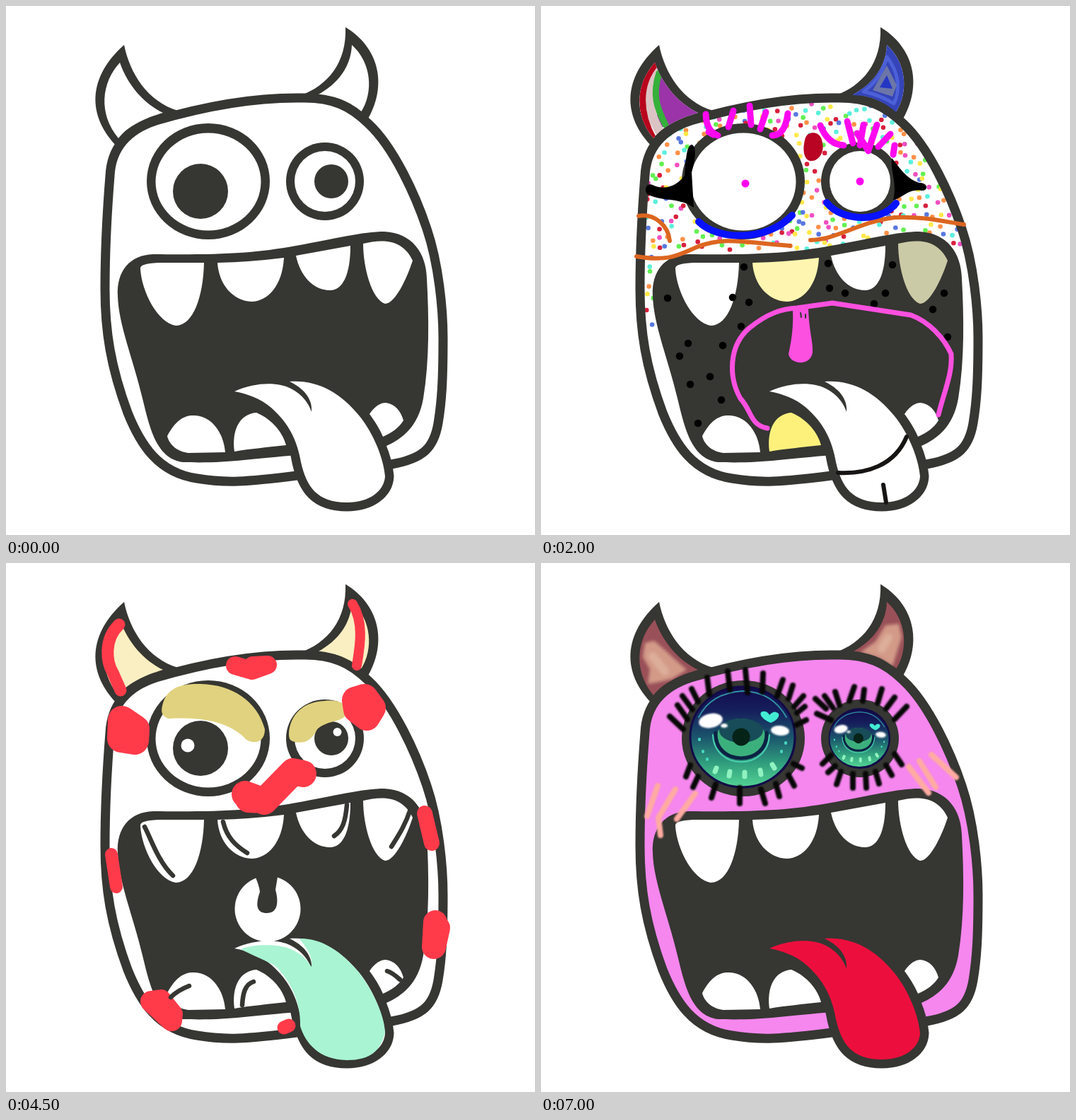
These frames come from a looping animation (748 px wide and 748 px high, 8 s). An HTML page with a canvas:

```html
<!DOCTYPE html>
<html lang="en">
<head>
<meta charset="utf-8">
<title>Monster makeovers</title>
<style>
html, body { margin: 0; height: 100%; overflow: hidden; background: #fff; }
canvas { display: block; width: 100vw; height: 100vh; }
</style>
</head>
<body>
<canvas width="748" height="748"></canvas>
<script>
const ctx = document.querySelector('canvas').getContext('2d');
const INK = '#363632', WHITE = '#fff';
ctx.lineCap = ctx.lineJoin = 'round';

const BODY = 'M411 664C340 673 310 675 270 668C215 660 190 620 172 575C148 510 140 460 140 400C140 340 143 290 147 240C149 200 172 175 212 162C280 142 350 129 418 130C462 129 488 142 512 166C549 200 580 270 595 315C612 365 618 430 618 470C618 530 616 560 611 590C605 625 590 640 545 648';
const MOUTH = 'M158 410C156 375 175 352 208 351C300 352 350 350 410 339C465 329 505 319 535 319C575 321 594 350 595 385C598 440 599 500 590 555C583 595 560 612 538 622L400 636C340 641 310 647 250 645C212 640 203 595 193 555C180 500 159 450 158 410Z';
const TONGUE = 'M323 545C355 531 385 532 403 541C420 550 428 562 432 574C434 555 420 540 401 531C438 528 472 545 500 580C520 605 534 640 536 665C535 685 515 702 482 702C440 702 425 680 417 645C412 615 400 590 375 568C360 555 340 548 323 545Z';
const HORNS = 'M167 55C175 95 200 135 243 148L215 165L158 200C113 155 116 100 167 55ZM480 30C527 58 541 112 510 163L470 150L415 127C455 113 482 80 480 30Z';
const LEFT_HORN = 'M161 80C172 112 195 138 222 151C195 159 172 170 159 187C130 152 135 108 161 80Z';
const RIGHT_HORN = 'M489 55C517 80 520 122 502 150C487 137 468 126 440 126C470 110 488 85 489 55Z';
const TEETH = [
  'M190 372C189 366 198 364 215 363L280 363C279 410 265 452 240 452C215 448 192 405 190 372Z',
  'M299 363Q345 362 393 356C391 395 370 418 347 418C322 417 301 395 299 363Z',
  'M410 353L487 339C487 380 476 402 458 402C435 402 416 382 410 353Z',
  'M505 336C530 330 560 328 575 360C567 385 550 421 536 421C517 415 505 370 505 336Z',
  'M228 608C240 585 253 578 267 579C292 580 308 605 310 631L258 632C240 630 230 618 228 608Z',
  'M323 630C319 600 330 577 354 575C378 585 392 605 396 621C370 624 345 626 323 630Z',
  'M514 577C522 565 530 561 537 561C550 563 558 572 562 586C555 597 546 603 533 609C528 597 520 585 514 577Z'
];

function fill(color, path) {
  ctx.fillStyle = color;
  ctx.fill(new Path2D(path));
}
function line(color, width, path) {
  ctx.strokeStyle = color;
  ctx.lineWidth = width;
  ctx.stroke(new Path2D(path));
}
function oval(color, x, y, rx, ry = rx, turn = 0) {
  ctx.fillStyle = color;
  ctx.beginPath();
  ctx.ellipse(x, y, rx, ry, turn, 0, 7);
  ctx.fill();
}
function clipped(path, draw) {
  ctx.save();
  ctx.clip(new Path2D(path));
  draw();
  ctx.restore();
}
function blurred(radius, draw) {
  ctx.filter = `blur(${radius}px)`;
  draw();
  ctx.filter = 'none';
}

function monster({ skin = WHITE, horn = WHITE, eye = WHITE, tongue = WHITE, teeth = {}, pupils = true, freckles }) {
  fill(WHITE, 'M0 0H748V748H0Z');
  fill(INK, HORNS);
  fill(horn, LEFT_HORN + RIGHT_HORN);
  fill(skin, BODY);
  if (freckles) clipped(BODY, freckles);
  line(INK, 13, BODY);
  oval(INK, 286, 248, 87, 82);
  oval(eye, 286, 248.5, 74.5, 69);
  oval(INK, 451, 248, 55);
  oval(eye, 451, 248, 43);
  if (pupils) {
    oval(INK, 275, 262, 39);
    oval(INK, 460, 248, 24);
  }
  fill(INK, MOUTH);
  TEETH.forEach((tooth, i) => fill(teeth[i] || WHITE, tooth));
  line(INK, 25, TONGUE);
  fill(tongue, TONGUE);
}

function confetti() {
  const colors = ['#d8203c', '#ffe94a', '#62f052', '#5cf0dc', '#ff9048', '#f050c0', '#5878e0'];
  let seed = 11;
  const random = () => (seed = seed * 16807 % 2147483647) / 2147483647;
  for (let y = 138; y < 455; y += 13)
    for (let x = 148; x < 600; x += 13) {
      const px = x + random() * 12, py = y + random() * 12;
      const color = colors[random() * 7 | 0];
      if (random() < .88 && (py < 346 || px < 160)) oval(color, px, py, 3.3);
    }
}

function partyLook() {
  monster({ pupils: false, freckles: confetti, teeth: { 1: '#fef6b0', 3: '#cbcaa6', 5: '#fdf17c' } });
  clipped(LEFT_HORN, () => {
    fill('#9a34a8', 'M160 75H230V165L165 172Z');
    line('#dcc4c4', 13, 'M160 90C146 120 152 150 168 178');
    line('#35b03a', 9, 'M167 95C157 125 164 145 176 168');
    line('#b8041c', 9, 'M162 82C138 110 138 150 159 188');
  });
  fill('#3544b8', RIGHT_HORN);
  line('#4c60d8', 5, 'M489 72C507 95 508 120 499 138C483 128 470 124 456 121C474 108 485 90 489 72Z');
  fill('#6c76a8', 'M489 84L503 112L497 128L469 119Z');
  fill('#2436c4', 'M489 98L497 117L479 115Z');
  fill('#b90424', 'M378 181C388 176 397 182 398 194C401 206 393 219 383 219C373 220 370 206 372 195Q373 184 378 181Z');

  const orange = '#dc6620', pink = '#fb50e0', magenta = '#ff08f0', blue = '#0812ff';
  line(orange, 6, 'M138 297C160 293 180 310 182 332M135 354C180 362 195 352 220 341C260 325 290 335 352 339M381 331C420 330 450 305 500 299C540 297 570 305 598 309');
  line(blue, 10, 'M223 305C250 332 320 333 355 296M404 278C425 305 480 307 502 279');
  line(magenta, 9, 'M233 153Q234 178 250 183M237 178L244 182M272 148L265 171M295 141L297 168M318 150L310 174M349 152Q345 183 327 183M395 169Q406 196 428 197M433 163L441 194M456 168L451 197M447 180L463 205M475 168L463 204M494 181L477 199M500 197L498 210');
  fill('#000', 'M213 196C220 198 219 215 213 235L216 285C195 270 170 277 150 266C145 258 150 248 160 254C180 262 195 250 203 240C205 220 205 198 213 196Z');
  fill('#000', 'M496 215C505 225 515 244 535 250C548 250 548 262 538 261C520 258 510 272 498 275C504 250 494 235 496 215Z');
  oval(magenta, 289, 251, 5.5);
  oval(magenta, 451, 248, 5.5);

  const specks = [287,369, 406,364, 497,366, 179,413, 271,412, 294,419, 408,399, 430,406, 487,406, 570,406, 471,421, 554,429, 575,468, 283,453, 208,477, 257,480, 196,495, 239,524, 211,535, 255,557, 222,590];
  for (let i = 0; i < specks.length; i += 2) oval('#000', specks[i], specks[i + 1], 5.3);

  line(pink, 7, 'M320 597C295 592 298 572 282 555C265 525 265 480 295 455C320 435 340 428 362 427L412 420L523 437C550 447 570 470 580 492C582 520 570 545 562 578');
  fill(pink, 'M356 430L378 428C379 460 385 475 384 490C381 510 352 507 350 492C355 470 357 450 356 430Z');
  line(INK, 2, 'M367 434L368 440M374 436V441');
  line('#171514', 6, 'M420 660C460 662 500 650 517 609M484 677L488 702');
}

function spottedLook() {
  monster({ horn: '#f9efc2' });
  const red = '#ff3b4a', lid = '#e1d27f', mint = '#a9f4d2';
  line(red, 17, 'M160 87C138 108 142 140 151 155L162 180');
  line(red, 14, 'M490 58C507 85 500 120 496 145');

  fill(lid, 'M221 202C226 178 245 170 275 171C320 172 355 195 366 235C366 255 350 256 340 250C315 222 270 218 230 220C220 217 219 210 221 202Z');
  fill(lid, 'M400 240C402 215 420 196 450 195C470 193 485 198 481 215C472 226 455 222 440 235C432 252 420 257 405 252C400 250 400 245 400 240Z');
  oval(WHITE, 257, 258, 9.5);
  oval(WHITE, 468.5, 239, 6);

  const spots = [
    [26, 'M324 145L348 152L370 144L349 145'],
    [40, 'M164 222L163 248L182 251L183 235Z'],
    [38, 'M494 194L507 190L518 205L510 218L496 207Z'],
    [38, 'M338 327L365 337M343 334L367 335L406 295L420 298'],
    [22, 'M592 354L602 396'],
    [34, 'M607 508L605 543L611 516'],
    [18, 'M149 412L156 458'],
    [30, 'M205 620L219 618L235 638L234 647Z'],
    [19, 'M393 657L400 654']
  ];
  for (const [width, path] of spots) line(red, width, path);

  line(INK, 6.5, 'M196 373C205 390 215 422 236 442M307 366C312 388 325 400 341 410M482 342C480 365 476 378 464 386M572 348C564 372 555 385 545 401M233 614Q243 604 259 598M334 625C335 608 338 596 350 592M539 577Q546 579 557 589');
  oval(WHITE, 370, 489, 46.5);
  fill(INK, 'M350 438Q358 455 359 465C352 485 355 495 369 495C384 495 386 480 381 462L385 438Z');
  fill(mint, 'M332 546C350 539 382 538 403 546C420 554 426 562 432 571C434 555 425 545 415 531C448 531 474 549 500 580C520 607 535 640 536 663C530 690 515 703 482 703C443 702 424 680 416 655C417 620 402 590 380 569C362 560 345 553 332 546Z');
}

function jewelEye(x, y, scale) {
  ctx.save();
  ctx.translate(x, y);
  ctx.scale(scale, scale);
  const shade = ctx.createLinearGradient(0, -72, 0, 72);
  ['#130a4c', '#15205c', '#1b546c', '#2f9c7c', '#55d696'].forEach((c, i) => shade.addColorStop(i / 4, c));
  oval(shade, 0, 0, 74, 71);
  line('#120b48', 3, 'M-74 0A74 71 0 0 1 74 0A74 71 0 0 1 -74 0');
  line('#2f8fa0', 2, 'M-62 -28Q-45 -62 0 -65Q42 -64 62 -28');
  oval('#3cb07c', -2, 2, 35, 28);
  oval('#174c58', -2, -9, 31, 17);
  line('#0c2244', 5, 'M-38 -6C-40 42 36 42 34 -6');
  line('#49cfae', 2, 'M-42 -3C-40 48 36 48 38 -3');
  oval('#062318', -2, 0, 12.5);
  line('#8ff2c0', 7, 'M-37 44L-39 49M-18 49L-19 55M3 50V56M25 47L26 53M42 39L45 44');
  line('#48d8c0', 4, 'M-56 20V21M-50 31V32M55 20V21M61 8V9M-61 3V4');
  fill('#42ecd2', 'M40 -20C27 -25 22 -34 28 -36Q35 -37 38 -31Q45 -39 51 -33C53 -28 47 -23 40 -20Z');
  blurred(1, () => {
    oval(WHITE, -45, -23, 17, 10, -.2);
    oval(WHITE, 53, -9, 13, 7, .1);
    oval(WHITE, -26, -16, 5, 3);
  });
  ctx.restore();
}

function glamLook() {
  monster({ skin: '#f587ee', horn: '#995058', eye: '#120b48', tongue: '#ec0f3d', pupils: false });
  clipped(LEFT_HORN + RIGHT_HORN, () => blurred(2, () => {
    fill('#d39a88', 'M147 113L160 110L174 122L188 135L206 151L185 164L168 168L151 171L154 150L144 133Z');
    fill('#d39a88', 'M487 88L506 86L510 105L497 146L480 135L452 126L473 111Z');
    line('#dcae9a', 12, 'M158 132L175 153M491 106L482 121');
  }));
  blurred(1, () => line('#ffaba2', 8, 'M165 315L150 358M190 320L166 360L169 385M218 326L192 362M520 288L548 325M535 280L558 317M552 271L587 303'));
  jewelEye(285, 246, 1);
  jewelEye(450, 248, .575);
  blurred(1.2, () => {
    line('#080808', 8, 'M182 217L201 235M193 201L207 221M200 188L214 207M213 178L222 196M235 162L238 186M264 153L267 179M289 151L292 183M314 156L313 182M342 165L334 188M356 173L350 192M371 188L358 203M373 203L362 212M375 222L361 229M211 286L205 302M222 302L215 317M247 313L241 332M281 318V340M311 320L317 340M332 312L337 330M350 300L358 315M357 284L369 290');
    line('#080808', 8, 'M388 192L403 206M390 213L410 222M401 188L413 205M416 182L422 201M443 175L436 195M457 179L455 195M482 178L476 198M500 190L488 206M517 203L500 221M398 284L410 272M406 296L416 287M418 313L424 295M441 298V318M459 298L460 318M473 295L478 312M488 286L496 300M500 270L510 285');
  });
}

const looks = [() => monster({}), partyLook, spottedLook, glamLook];
let shown = -1;

function tick() {
  const t = performance.now() % 8000;
  const index = t < 500 ? 0 : 1 + Math.floor((t - 500) / 2500);
  if (index !== shown) looks[shown = index]();
  requestAnimationFrame(tick);
}
tick();
</script>
</body>
</html>
```
